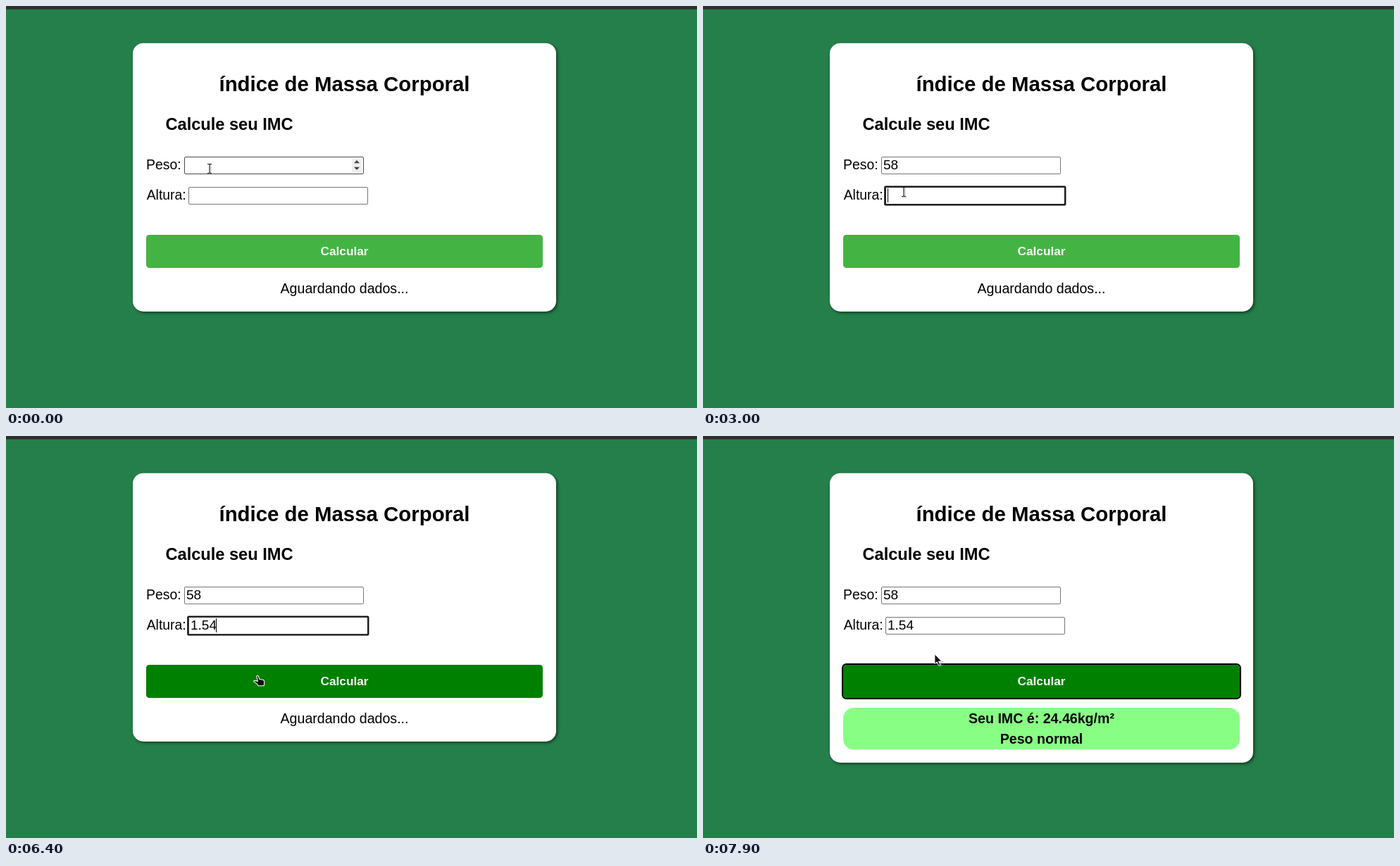
Animation, 981 px wide and 571 px high, one loop 8 s. Source, as an HTML page:

```html
<!DOCTYPE html>
<html lang="pt-BR">
<head>
<meta charset="utf-8">
<title>IMC</title>
<style>
  html, body { margin: 0; width: 100%; height: 100%; overflow: hidden; background: #257f4a; }
  svg { display: block; width: 981px; height: 571px; font: 19.6px "Liberation Sans", Arial, sans-serif; }
  .bold { font-weight: bold; }
  .center { text-anchor: middle; }
  .card { filter: drop-shadow(2px 2px 2px rgba(0, 0, 0, .5)); }
  .box { fill: #fff; stroke: #767676; }
  .box.hover { stroke: #4a4a4a; }
  .ring { fill: none; stroke: #101010; stroke-width: 2.2; }
  .value { font-size: 19.1px; }
</style>
</head>
<body>
<svg viewBox="0 0 981 571">
  <defs>
    <g id="ibeam" fill="none">
      <path d="M-2 8H4M2 -6V7" stroke="#bbb"/>
      <path d="M-3 -6.5H-.8L0 -5.7L.8 -6.5H3M-3 6.5H-.8L0 5.7L.8 6.5H3M0 -6V6" stroke="#222" stroke-width="1.2"/>
    </g>
    <g id="arrow">
      <path d="M3 14L13 10V12L9 13L11 17L8 18Z" fill="#999" opacity=".6"/>
      <path d="M.5 .5V14.2L3.7 11.3L6 16.6L8.3 15.6L6 10.5H10.4Z" fill="#111" stroke="#fff" stroke-width=".8"/>
    </g>
    <path id="hand" d="M-1.7 .6Q0 -1.2 1 .8L2.2 4.8L8.4 6.3Q9.3 7 9.2 9L8.8 14.2H.5L-1 11.6L-5.5 8.6Q-6.3 7 -4.4 6.9L-.2 7.9Z"
      fill="#111" stroke="#fff" stroke-width="1.1" stroke-linejoin="round"/>
  </defs>

  <rect width="981" height="571" fill="#257f4a"/>
  <rect width="981" height="4.7" fill="#2f2f2f"/>
  <rect class="card" id="card" x="180" y="52.7" width="601" rx="15" fill="#fff"/>

  <text class="bold center" x="480.5" y="120.5" font-size="29.4">índice de Massa Corporal</text>
  <text class="bold" x="226.5" y="175.8" font-size="23.6">Calcule seu IMC</text>

  <text x="199" y="232.3" font-size="19.4">Peso:</text>
  <rect class="box" id="weightBox" x="253.5" y="214.5" width="254" height="24" rx="1.5"/>
  <rect class="ring" id="weightRing" x="253" y="213.3" width="255.5" height="26" rx="1"/>
  <g id="spinner">
    <rect x="491" y="217" width="14" height="19" fill="#efefef"/>
    <path d="M494 223.2L498 219L502 223.2ZM494 228.8L498 233L502 228.8Z" fill="#444"/>
  </g>
  <text class="value" id="weight" x="255.9" y="232.3"></text>

  <text x="199.7" y="275.4" font-size="19.4">Altura:</text>
  <rect class="box" id="heightBox" x="259.5" y="257.5" width="254" height="24" rx="1.5"/>
  <rect class="ring" id="heightRing" x="258.3" y="256.5" width="256" height="26" rx="1"/>
  <text class="value" id="height" x="261.9" y="275.4"></text>
  <rect id="caret" width="1" height="20"/>

  <rect id="button" x="199" y="325" width="563" height="47" rx="4.5"/>
  <rect id="buttonRing" x="198" y="324" width="565" height="49" rx="5.5" fill="none" stroke="#000" stroke-width="2"/>
  <text class="bold center" x="480.5" y="354.2" font-size="17.2" fill="#fff">Calcular</text>

  <text class="center" id="waiting" x="480.5" y="407.6">Aguardando dados...</text>
  <g class="bold center" id="result">
    <rect x="199" y="386" width="563" height="59.3" rx="15" fill="#88ff84"/>
    <text x="480.5" y="407.6">Seu IMC é: 24.46kg/m²</text>
    <text x="480.5" y="436.7">Peso normal</text>
  </g>
  <use id="pointer"/>
</svg>
<script>
const LOOP = 8000;
const el = id => document.getElementById(id);
const show = (id, on) => el(id).setAttribute('visibility', on ? 'visible' : 'hidden');
const set = (id, attrs) => Object.entries(attrs).forEach(([k, v]) => el(id).setAttribute(k, v));

// Each track lists [start in ms, value...]; a value holds until the next start.
const weightKeys = [[0, ''], [1400, '5'], [1700, '58']];
const heightKeys = [[0, ''], [3900, '1'], [4400, '1.'], [4700, '1.5'], [5200, '1.54']];
const carets = [
  [0, 0], [300, 256], [800, 0], [1400, 267], [1700, 277], [2200, 0], [2800, 277],
  [3000, 262], [3400, 0], [3900, 272], [4400, 277], [4700, 287], [5200, 298],
  [5900, 0], [6400, 298], [6900, 0]
];
const pointers = [
  [0, 'ibeam', 289, 231], [2300, 'arrow', 288, 242], [2400, 'arrow', 287, 250],
  [2500, 'arrow', 286, 255], [2800, 'ibeam', 285, 264], [5600, 'ibeam', 303, 275],
  [5700, 'hand', 340, 331], [5900, 'hand', 352, 338], [6000, 'hand', 357.5, 340.5],
  [7900, 'arrow', 328.5, 309.5]
];
const buttonColors = [[0, '#43b443'], [5700, '#008000'], [6900, '#adff2f'], [7000, '#008000']];

const at = (track, t) => track.findLast(([start]) => start <= t).slice(1);
const within = (t, from, to) => t >= from && t < to;

function draw(t) {
  const done = t >= 7000;
  el('weight').textContent = at(weightKeys, t)[0];
  el('height').textContent = at(heightKeys, t)[0];

  el('weightBox').classList.toggle('hover', t < 2300);
  el('heightBox').classList.toggle('hover', within(t, 2800, 5700));
  show('spinner', t < 2300);
  show('weightRing', within(t, 300, 3000));
  show('heightRing', within(t, 3000, 6900));

  const [caretX] = at(carets, t);
  show('caret', caretX > 0);
  set('caret', { x: caretX, y: t < 3000 ? 216 : 259 });

  set('button', { fill: at(buttonColors, t)[0] });
  show('buttonRing', t >= 6900);
  set('card', { height: done ? 411.3 : 381.3 });
  show('waiting', !done);
  show('result', done);

  const [shape, x, y] = at(pointers, t);
  set('pointer', { href: '#' + shape, x, y });
}

function tick() {
  draw(performance.now() % LOOP);
  requestAnimationFrame(tick);
}
tick();
</script>
</body>
</html>
```
